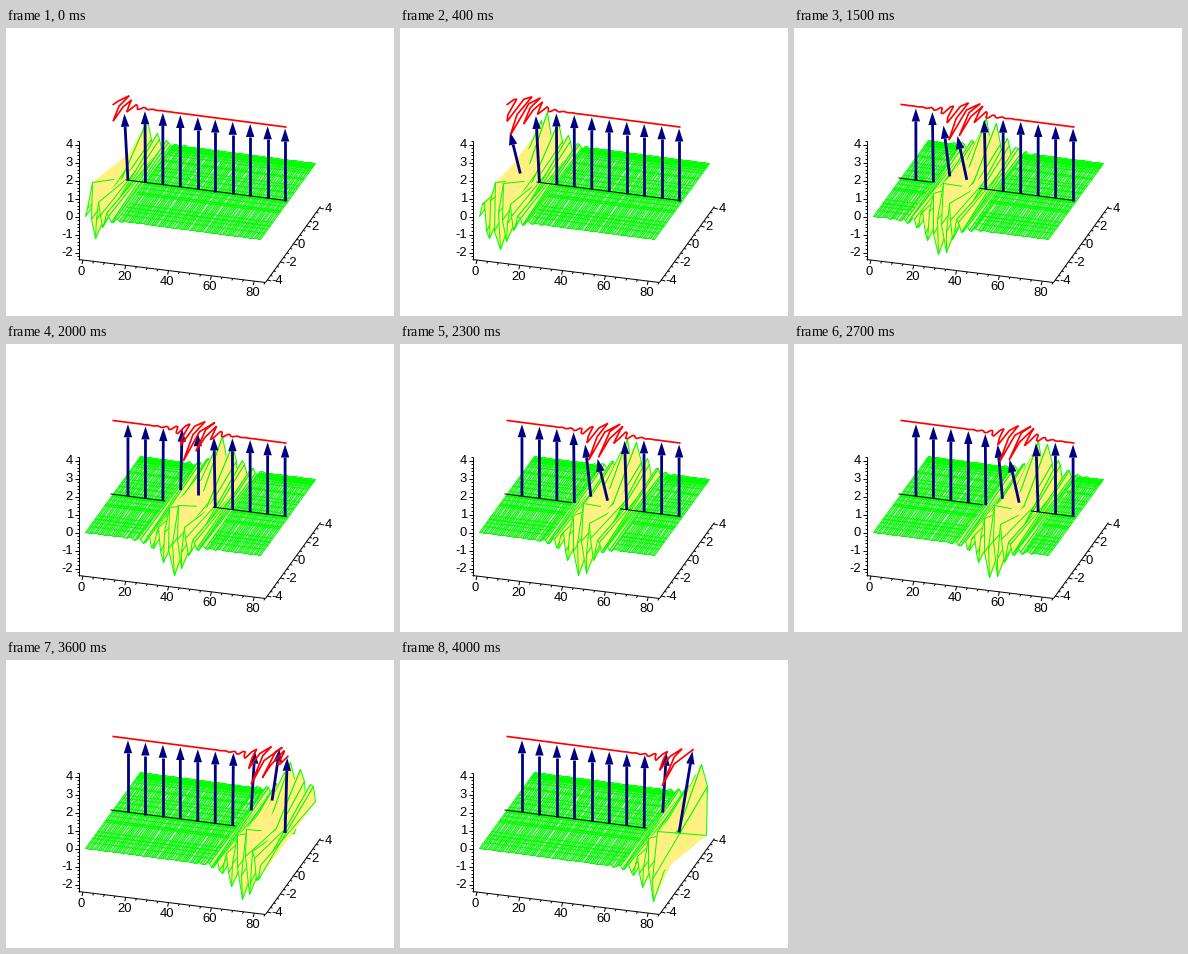
Recreate the animation shown at these times as a matplotlib script. Size 388 by 288 pixels, loop 4100 ms.

```python
import numpy as np
import matplotlib.pyplot as plt
from matplotlib.animation import FuncAnimation
from matplotlib.collections import LineCollection, PolyCollection

W, H, DPI = 388, 288, 100
PX = 72 / DPI                    # one pixel in points
FRAMES = 41
GREEN, NAVY = "#00ff00", "#000080"
FLAT = np.array([218, 220, 216]) / 255
YELLOW = np.array([255, 240, 130]) / 255

# Screen vectors of the half width across the strip and of the arrow height
ACROSS = np.array([27.5, -38.0])
UP = np.array([0.0, -72.0])

COLS = 83
s = np.linspace(0, 10, COLS)     # position along the strip, in arrow spacings


def along(start, end, n):
    """Points on a straight screen line for positions 0..10."""
    start, end = np.array(start, float), np.array(end, float)
    return start + np.asarray(n, float)[..., None] / 10 * (end - start)


def envelope(n, t):
    return 1 / np.cosh(1.95 * (n + 0.08 - t / 4))


def twist(n, t):
    """Twist angle of the wave packet; its phase runs against the packet."""
    phase = 1.94 * n + 0.275 * t - 0.45
    angle = 0.54 * envelope(n, t) * np.cos(2 * np.pi * phase)
    return np.where(n == 0, 0, angle)


def normal(a):
    a = np.asarray(a)[..., None]
    return np.sin(a) * ACROSS + np.cos(a) * UP


def sideways(a):
    a = np.asarray(a)[..., None]
    return np.cos(a) * ACROSS - np.sin(a) * UP


fig = plt.figure(figsize=(W / DPI, H / DPI), dpi=DPI, facecolor="white")
ax = fig.add_axes([0, 0, 1, 1])
ax.set_xlim(-0.5, W - 0.5)
ax.set_ylim(H - 0.5, -0.5)
ax.axis("off")

axis_pts = along((106.5, 150), (281.5, 173), s)
base_pts = along((104.5, 149.5), (279.5, 172), s)
curve_pts = along((106.8, 148), (279.2, 170.5), s)
arrow_n = np.arange(1, 11)
arrow_base = along((104, 149.5), (278.6, 172), arrow_n)


def draw_axes():
    corner, right, back = (72, 231), (259, 254), (314, 178)
    segs = [[(72, 112), corner], [corner, right], [right, back]]

    def label(x, y, text, ha):
        ax.text(x, y, text, ha=ha, va="center_baseline", fontsize=13 * PX,
                family="Liberation Sans", color="black")

    for k in range(-11, 22):                      # z axis
        y = 188 - 18 * k / 5
        major = k % 5 == 0
        segs.append([(72 - (4 if major else 2), y), (72, y)])
        if major:
            label(66.5, y - 0.5, str(k // 5), "right")
    for k in range(0, 18):                        # x axis
        x = 76.5 + 2.14 * 5 * k
        y = 231 + (x - 72) * 23 / 187
        major = k % 4 == 0
        segs.append([(x, y), (x - 1, y + (4 if major else 2))])
        if major:
            label(x - 1.5, y + 10, str(5 * k), "center")
    for k in range(-8, 9):                        # y axis
        x, y = 287 + 3.28 * k, 215.5 - 4.5 * k
        major = k % 4 == 0
        size = 4 if major else 2
        segs.append([(x, y), (x + size, y + size * 0.25)])
        if major:
            label(x + 4.5, y - 0.3, str(k // 2), "left")
    ax.add_collection(LineCollection(segs, colors="black", linewidths=PX))


draw_axes()

sheet = PolyCollection([], linewidths=PX, zorder=3)
streaks = LineCollection([], colors=GREEN, linewidths=1.2 * PX, zorder=3.5)
ax.add_collection(sheet)
ax.add_collection(streaks)
base_line, = ax.plot([], [], color="black", lw=PX, zorder=4)
shafts = LineCollection([], colors=NAVY, linewidths=2.8 * PX, zorder=5,
                        capstyle="butt")
heads = PolyCollection([], facecolors=NAVY, edgecolors="none", zorder=5)
ax.add_collection(shafts)
ax.add_collection(heads)
curve, = ax.plot([], [], color="red", lw=1.7 * PX, zorder=6,
                 solid_joinstyle="bevel")

streak_rows = np.random.default_rng(4).uniform(-1, 1, 30)


def draw_sheet(a, flat):
    """Twisted quads, each two filled triangles under a green outline."""
    side = sideways(a)
    front, rear = np.round(axis_pts - side), np.round(axis_pts + side)
    bend = np.maximum(abs(a[1:]), abs(a[:-1]))
    mix = np.clip(bend / 0.06, 0, 1)
    verts, faces, edges = [], [], []
    for i in range(COLS - 1):
        f0, f1, r0, r1 = front[i], front[i + 1], rear[i], rear[i + 1]
        fill = (*(FLAT + mix[i] * (YELLOW - FLAT)), 1)
        verts += [[f0, r0, r1], [f0, r1, f1], [f0, r0, r1, f1]]
        faces += [fill, fill, "none"]
        edges += ["none", "none", GREEN]
    sheet.set_verts(verts)
    sheet.set_facecolor(faces)
    sheet.set_edgecolor(edges)
    level = np.where(flat[:, None], axis_pts, np.nan)
    streaks.set_segments([level + v * ACROSS for v in streak_rows])


def update(t):
    a = twist(s, t)
    draw_sheet(a, envelope(s, t) < 0.06)

    # The packet covers part of the base line and the feet of the arrows
    u = s - t / 4
    covered = (u > -1.9) & (u < 0.77)
    base_line.set_data(base_pts[:, 0],
                       np.where(covered, np.nan, base_pts[:, 1]))

    stems, tips = [], []
    angles = twist(arrow_n.astype(float), t)
    for n, foot, angle in zip(arrow_n, arrow_base, angles):
        vec = normal(angle)
        tip = foot + vec
        d = vec / np.hypot(*vec)
        across = np.array([-d[1], d[0]])
        neck = tip - 13 * d
        near = -1.3 < n - t / 4 < 0.7 and n < 10
        cut = 0.14 + 0.5 * max(angle, 0) if near else 0
        stems.append([foot + cut * vec, neck])
        tips.append([tip, neck + 4.2 * across, neck - 4.2 * across])
    shafts.set_segments(stems)
    heads.set_verts(tips)

    red = curve_pts + normal(a)
    curve.set_data(red[:, 0], red[:, 1])
    return sheet, streaks, base_line, shafts, heads, curve


anim = FuncAnimation(fig, update, frames=FRAMES, interval=100,
                     repeat=True, repeat_delay=0, blit=False)
plt.show()
```
